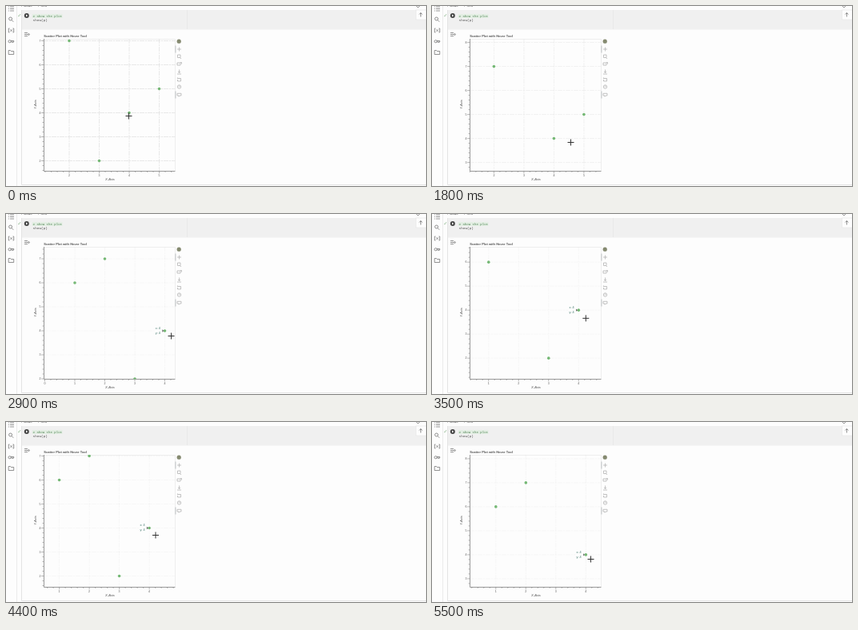
These frames come from a looping animation (525x225 px, 5.6 s). An HTML page:

```html
<!DOCTYPE html>
<html lang="en">
<head>
<meta charset="utf-8">
<title>Pannable scatter plot</title>
<style>
  html, body { margin: 0; width: 100%; height: 100%; overflow: hidden; background: #fdfdfd; }
  svg { display: block; width: 100%; height: 100%; }
  text { font-family: "Liberation Sans", Arial, sans-serif; fill: #555; }
  .code { font-family: "Liberation Mono", monospace; }
  .tick { font-size: 3.6px; }
  .axis { font-size: 4.1px; font-style: italic; text-anchor: middle; }
  .tip { font-size: 3.8px; fill: #3d7468; }
  .icon { fill: none; stroke: #666; stroke-width: .7; }
  .tool { fill: none; stroke: #b4b4b4; stroke-width: .8; }
</style>
</head>
<body>
<svg viewBox="0 0 525 225">
  <defs><clipPath id="area"><rect x="47" y="41" width="165" height="165.5"/></clipPath></defs>
  <rect width="525" height="225" fill="#fdfdfd"/>

  <!-- Notebook chrome -->
  <path d="M13.5 0V225" stroke="#ececec"/>
  <text x="18" y="1.4" font-size="4.5">+ Code</text>
  <text x="39" y="1.4" font-size="4.5">+ Text</text>
  <path d="M513 0l2 2 2-2" class="icon"/>
  <rect x="19" y="5" width="506" height="24.5" fill="#f0f0f0"/>
  <path d="M226.5 5V29" stroke="#e4e4e4" stroke-width=".7"/>
  <path d="M19.5 5V223.5H525" fill="none" stroke="#e4e4e4"/>
  <rect x="512.5" y="5" width="13" height="12" fill="#fdfdfd" stroke="#e4e4e4" stroke-width=".6"/>
  <path d="M518.5 13.5V8.5m-2 2l2-2 2 2" class="icon"/>
  <path d="M15 12l1 1 2-3" class="icon" style="stroke:#7aa87a;stroke-width:.6"/>
  <circle cx="25.8" cy="12" r="3" fill="#444"/>
  <path d="M25 10.5v3l2.2-1.5z" fill="#fff"/>
  <rect x="33" y="10" width="37.5" height="5" fill="#e3eee3"/>
  <text x="33.5" y="13.8" class="code" font-size="4.07" style="fill:#4b8050">#&#160;Show the plot</text>
  <text x="33.5" y="19.2" class="code" font-size="4.4">show(p)</text>
  <path d="M23 33.5h4m-4 2h5.5m-5.5 2h4M28 34l1.5 1.5-1.5 1.5" class="icon"/>
  <g class="icon">
    <path d="M3 1h1m1 0h5M3 3.5h1m1 0h5M3 6h1m1 0h5"/>
    <circle cx="5.6" cy="16" r="2"/><path d="M7 17.5l2.3 2.3"/>
    <path d="M4.5 28H3.3v5h1.2M8.5 28H9.7v5H8.5M5.4 29.3l2.2 2.5m0-2.5l-2.2 2.5"/>
    <circle cx="4.6" cy="44.2" r="1.6"/><path d="M6 43.5h3.7v1.5H6m2.5 0v1"/>
    <path d="M3.2 60.5v-5h2.3l.8 1h3.4v4z"/>
  </g>

  <!-- Plot frame -->
  <text x="47.3" y="39.2" font-size="4.05" font-weight="bold">Scatter Plot with Hover Tool</text>
  <path d="M47 41.5H211.5V206" fill="none" stroke="#e8e8e8" stroke-width=".7"/>
  <g id="grid" clip-path="url(#area)"></g>
  <path d="M47.5 41V206.5H211.5" fill="none" stroke="#808080" stroke-width=".8"/>
  <g id="ticks"></g>
  <text class="axis" x="130" y="218.2">X-Axis</text>
  <text class="axis" transform="translate(38.4 123) rotate(-90)">Y-Axis</text>

  <!-- Plot tools -->
  <circle cx="216.2" cy="44.2" r="2.6" fill="#858a70"/>
  <path d="M211.9 49.5v9M211.9 106.5v9" stroke="#bcc0c3"/>
  <g class="tool">
    <path d="M214 54h5m-2.5-2.5v5"/>
    <path d="M214.5 61h3.5v3.5h-3.5zM218 65l1 1"/>
    <path d="M214 71h4v3h-4zM218 70.5h1.5v2"/>
    <path d="M216.5 79.5v4m-1.5-1.5l1.5 1.5 1.5-1.5M214 85h5"/>
    <path d="M214.5 90.5h4v3.5h-4v-2m0-2.5v1.5"/>
    <circle cx="216.5" cy="101" r="2.2"/><path d="M215.8 100.5q.8-1 1.3 0l-.6 1"/>
    <path d="M214 109.3h5v2.7h-2l-1 1.2v-1.2h-2z"/>
  </g>

  <g id="points" clip-path="url(#area)"></g>
  <g id="tip">
    <rect x="-13" y="-7" width="9.5" height="12" fill="#fdfdfd"/>
    <text class="tip" x="-11.7" y="-2.3">x: 4</text>
    <text class="tip" x="-11.7" y="3.7">y: 4</text>
    <path d="M-3.2-1.7v3.4l2-1.7z" fill="#666"/>
  </g>
  <path id="cursor" d="M-4 0H4M0-4V4" stroke="#333"/>
</svg>
<script>
const LOOP = 5600, STEP = 100, UNIT_X = 37.5, UNIT_Y = 30;
const LEFT = 47, RIGHT = 211.5, TOP = 41, BOTTOM = 206.5;
const data = [[1, 6], [2, 7], [3, 2], [4, 4], [5, 5]];

// time, screen position of data point (4, 4), cursor position, grid strength
const poses = [
  [0,    154,   133.5, 153.5, 137.5, 1],
  [600,  154,   133.5, 153.5, 137.5, 1],
  [1100, 109,   73.2,  105.5, 73.5,  .6],
  [1800, 152.4, 165.6, 173.5, 170.5, .6],
  [2900, 198.5, 146,   206.5, 152.5, .3],
  [4000, 171.7, 100.5, 181.5, 113.5, .3],
  [4800, 186.5, 164.6, 192.5, 169.5, .3],
  [5100, 186.5, 164.6, 192.5, 169.5, .3],
  [5500, 192.3, 165.9, 198.5, 171.5, .3]
];

const $ = id => document.getElementById(id);
const line = (x1, y1, x2, y2, style) => `<path d="M${x1} ${y1}L${x2} ${y2}" ${style}/>`;
const label = (x, y, anchor, value) =>
  `<text class="tick" x="${x}" y="${y}" text-anchor="${anchor}">${value}</text>`;

function poseAt(time) {
  const next = poses.findIndex(p => p[0] >= time);
  if (next <= 0) return poses[0];
  const a = poses[next - 1], b = poses[next];
  const u = (time - a[0]) / (b[0] - a[0]), eased = u * u * (3 - 2 * u);
  return a.map((v, i) => v + (b[i] - v) * eased);
}

function draw(time) {
  const [, px, py, cx, cy, strength] = poseAt(time);
  const toX = x => px + (x - 4) * UNIT_X;
  const toY = y => py - (y - 4) * UNIT_Y;
  const gridStyle = `stroke="#e4e4e4" stroke-width=".8" stroke-dasharray="6 1 2 1" opacity="${strength}"`;
  const tickStyle = 'stroke="#808080" stroke-width=".6"';
  let grid = "", ticks = "";

  // Five minor ticks per unit on both axes
  for (let i = -10; i <= 50; i++) {
    const major = i % 5 === 0, value = i / 5;
    const x = toX(value), y = toY(value), length = major ? 2.8 : 1.5;
    if (x >= LEFT && x <= RIGHT) {
      ticks += line(x, BOTTOM, x, BOTTOM + length, tickStyle);
      if (major) {
        grid += line(x, TOP, x, BOTTOM, gridStyle);
        ticks += label(x, 212.8, "middle", value);
      }
    }
    if (y >= TOP && y <= BOTTOM) {
      ticks += line(LEFT - length, y, LEFT, y, tickStyle);
      if (major) {
        grid += line(LEFT, y, RIGHT, y, gridStyle);
        ticks += label(43.5, y + 1.3, "end", value);
      }
    }
  }
  $("grid").innerHTML = grid;
  $("ticks").innerHTML = ticks;
  $("points").innerHTML = data.map(([x, y]) =>
    `<circle cx="${toX(x)}" cy="${toY(y)}" r="1.8" fill="#74b874"/>`).join("");
  $("tip").setAttribute("transform", `translate(${px} ${py})`);
  $("tip").style.display = time >= 2400 ? "" : "none";
  $("cursor").setAttribute("transform", `translate(${cx} ${cy})`);
}

function tick() {
  draw(Math.floor(performance.now() % LOOP / STEP) * STEP);
  requestAnimationFrame(tick);
}
tick();
</script>
</body>
</html>
```
